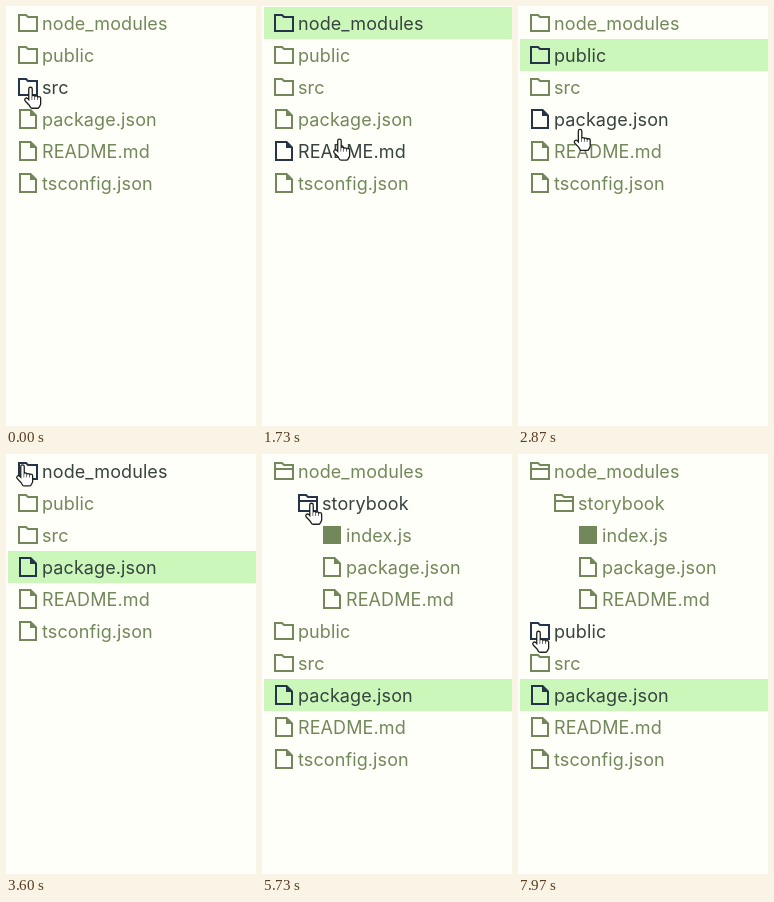
An HTML page with a canvas that plays this animation: 250x420 px, repeating every 8 s.

```html
<!DOCTYPE html>
<html lang="en">
<head>
<meta charset="utf-8">
<title>File tree</title>
<style>
  html, body { margin: 0; width: 100%; height: 100%; overflow: hidden; background: #fffff9; }
  canvas { display: block; width: 250px; height: 420px; }
</style>
</head>
<body>
<canvas id="stage"></canvas>
<script>
const LOOP = 8000, W = 250, H = 420;
const ROW = 32, TOP = 1, INDENT = 24;
const TRAVEL = 400, CLICK_DELAY = 150;
const PAPER = '#fffff9', SELECTED = '#cbf7bb';
const MUTED = '#73885a', DARK_TEXT = '#37433e', DARK_ICON = '#26344a';

const canvas = document.getElementById('stage');
const ctx = canvas.getContext('2d');
const ratio = window.devicePixelRatio || 1;
canvas.width = W * ratio;
canvas.height = H * ratio;

const file = name => ({ name, icon: 'file' });
const folder = (name, children = []) => ({ name, icon: 'folder', children });
const tree = [
  folder('node_modules', [
    folder('storybook', [
      { name: 'index.js', icon: 'script' },
      file('package.json'),
      file('README.md')
    ])
  ]),
  folder('public'),
  folder('src'),
  file('package.json'),
  file('README.md'),
  file('tsconfig.json')
];

// Where the pointer arrives, and what it clicks there
const visits = [
  { at: 0, row: 2, x: 18 },
  { at: 850, row: -0.1, x: 95, select: 'node_modules' },
  { at: 1600, row: 4.5, x: 76 },
  { at: 2000, row: 1, x: 56, select: 'public' },
  { at: 2590, row: 4.5, x: 54 },
  { at: 2990, row: 3, x: 56, select: 'package.json' },
  { at: 3500, row: -0.2, x: 10, toggle: 'node_modules' },
  { at: 4250, row: 1, x: 43, toggle: 'storybook' },
  { at: 5000, row: 1, x: 43, toggle: 'storybook' },
  { at: 5450, row: 1, x: 43, toggle: 'storybook' },
  { at: 6250, row: -0.1, x: 18, toggle: 'node_modules' },
  { at: 6650, row: -0.1, x: 18, toggle: 'node_modules' },
  { at: 7760, row: 8.4, x: 14 },
  { at: 7960, row: 5, x: 14 }
];

const smooth = p => p * p * (3 - 2 * p);
const mix = (a, b, p) => a + (b - a) * p;

function pointerAt(t) {
  const from = visits.filter(v => v.at <= t).pop();
  const to = visits.find(v => v.at > t) || from;
  const span = Math.min(TRAVEL, to.at - from.at) || 1;
  const p = smooth(Math.min(1, Math.max(0, 1 - (to.at - t) / span)));
  return { x: mix(from.x, to.x, p), y: mix(from.row, to.row, p) * ROW + 16 };
}

function stateAt(t) {
  const open = new Set();
  let selected = null;
  for (const v of visits) {
    if (v.at + CLICK_DELAY > t) break;
    if (v.select) selected = v.select;
    if (v.toggle && !open.delete(v.toggle)) open.add(v.toggle);
  }
  return { open, selected };
}

function visibleRows(nodes, open, depth = 0) {
  return nodes.flatMap(node => {
    const isOpen = open.has(node.name);
    const row = { ...node, depth, isOpen };
    return isOpen ? [row, ...visibleRows(node.children, open, depth + 1)] : [row];
  });
}

const folderShape = new Path2D('M3 4H10L12 6H21V20H3Z');
const folderFold = new Path2D('M3 10H21');
const fileShape = new Path2D('M4 3H14.6L20 8.4V21H4Z');
const fileFold = new Path2D('M14 3V9H20Z');

function drawIcon(row, x, y) {
  ctx.save();
  ctx.translate(x, y);
  ctx.lineWidth = 2;
  if (row.icon === 'script') {
    ctx.fillRect(3, 3, 18, 18);
  } else if (row.icon === 'folder') {
    ctx.stroke(folderShape);
    if (row.isOpen) ctx.stroke(folderFold);
  } else {
    ctx.stroke(fileShape);
    ctx.fill(fileFold);
  }
  ctx.restore();
}

function drawRow(row, y, hovered, selected) {
  const x = 10 + row.depth * INDENT;
  const dark = hovered || selected;
  if (selected) {
    ctx.fillStyle = SELECTED;
    ctx.fillRect(2, y, W - 2, ROW);
  }
  ctx.fillStyle = ctx.strokeStyle = dark ? DARK_ICON : MUTED;
  drawIcon(row, x, y + 4);
  ctx.fillStyle = dark ? DARK_TEXT : MUTED;
  ctx.fillText(row.name, x + 26, y + 23);
}

// Round strokes for fingers, thumb and palm
const hand = new Path2D('M2.5 13.8L6.5 18M6.5 15H14.9V18L13.5 20.5H8L6.5 18Z');
for (let i = 0; i < 4; i++) {
  const x = 6.5 + i * 2.8;
  hand.moveTo(x, i ? 10.5 + i * 0.6 : 3);
  hand.lineTo(x, 16);
}

function drawPointer({ x, y }) {
  ctx.save();
  ctx.translate(x, y);
  ctx.lineCap = ctx.lineJoin = 'round';
  for (const [color, width] of [['#1d211c', 4.8], ['#fff', 2.2]]) {
    ctx.fillStyle = ctx.strokeStyle = color;
    ctx.lineWidth = width;
    ctx.stroke(hand);
    ctx.fill(hand);
  }
  ctx.restore();
}

function draw(t) {
  const pointer = pointerAt(t);
  const { open, selected } = stateAt(t);
  const hotX = pointer.x + 6, hotY = pointer.y + 1;

  ctx.setTransform(ratio, 0, 0, ratio, 0, 0);
  ctx.fillStyle = PAPER;
  ctx.fillRect(0, 0, W, H);
  ctx.font = '18px Inter, sans-serif';
  ctx.letterSpacing = '0.1px';

  visibleRows(tree, open).forEach((row, i) => {
    const y = TOP + i * ROW;
    const hovered = hotY >= y && hotY < y + ROW && hotX >= 8 + row.depth * INDENT;
    drawRow(row, y, hovered, row.depth === 0 && row.name === selected);
  });
  drawPointer(pointer);
}

const start = performance.now();
function tick() {
  draw((performance.now() - start) % LOOP);
  requestAnimationFrame(tick);
}
tick();
</script>
</body>
</html>
```
